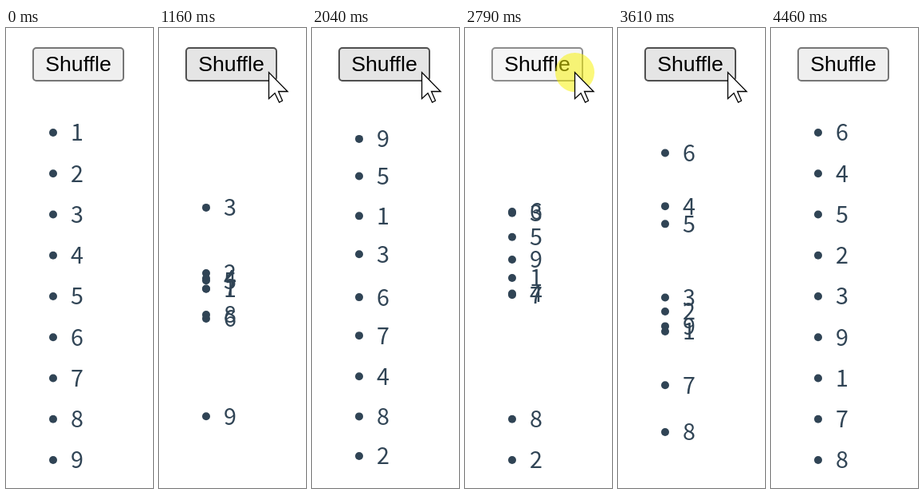
Animation, 184 px wide and 576 px high, one loop 4500 ms. Source, as an HTML page:

```html
<!DOCTYPE html>
<html lang="en">
<head>
<meta charset="utf-8">
<title>Shuffle list</title>
<style>
  html, body { margin: 0; width: 100%; height: 100%; overflow: hidden; background: #fff; }
  svg { display: block; width: 184px; height: 576px; }
  .button rect { fill: #efefef; stroke: #767676; stroke-width: 2; }
  .button.hover rect { fill: #e5e5e5; stroke: #4f4f4f; }
  .button.active rect { fill: #f5f5f5; stroke: #8d8d8d; }
  .button text { font: 26.67px "Liberation Sans", Arial, sans-serif; text-anchor: middle; }
  .list { fill: #304455; font: 28.7px "Noto Sans CJK SC", "Noto Sans CJK JP", "Noto Sans", sans-serif; text-anchor: middle; }
  .halo { fill: rgba(248, 242, 0, .52); }
  .cursor { fill: #fff; stroke: #000; stroke-width: 1.3; }
</style>
</head>
<body>
<svg viewBox="0 0 184 576">
  <g class="button">
    <rect x="34" y="25" width="113" height="41" rx="4"/>
    <text x="90.5" y="54">Shuffle</text>
  </g>
  <g class="list"></g>
  <circle class="halo" cx="137.5" cy="55.5" r="24.5"/>
  <path class="cursor" d="M137.5 55.5V88.5L145 81.5L150.5 93L154.5 91L149.5 79.5H161Z"/>
</svg>
<script>
const LOOP = 4500, MOVE = 1000, TOP = 131, ROW = 51.25;
const START = "123456789";

// press time, release time, order after the click
const clicks = [
  [440, 497, "378496512"],
  [725, 790, "526431879"],
  [945, 1010, "738125469"],
  [1165, 1230, "951367482"],
  [2410, 2489, "634751982"],
  [2730, 2800, "657318429"],
  [2945, 3010, "146958273"],
  [3155, 3220, "645239178"]
];

const $ = s => document.querySelector(s);
const button = $(".button"), list = $(".list"), halo = $(".halo"), cursor = $(".cursor");

function add(tag, attrs, parent) {
  const el = document.createElementNS("http://www.w3.org/2000/svg", tag);
  for (const k in attrs) el.setAttribute(k, attrs[k]);
  return parent.appendChild(el);
}

const items = [...START].map(digit => {
  const el = add("g", {}, list);
  add("circle", { cx: 59, cy: 0, r: 5 }, el);
  add("text", { x: 89, y: 10.4 }, el).textContent = digit;
  return { digit, el };
});

// CSS "ease": cubic-bezier(.25, .1, .25, 1)
function ease(x) {
  if (x <= 0) return 0;
  if (x >= 1) return 1;
  const bez = (a, b, u) => 3 * a * u * (1 - u) ** 2 + 3 * b * u * u * (1 - u) + u ** 3;
  let lo = 0, hi = 1;
  for (let i = 0; i < 24; i++) {
    const mid = (lo + hi) / 2;
    if (bez(.25, .25, mid) < x) lo = mid; else hi = mid;
  }
  return bez(.1, 1, lo);
}

// Each click starts a new move from wherever the item is
function slotAt(digit, t) {
  let slot = START.indexOf(digit);
  clicks.forEach(([, start, order], i) => {
    if (t <= start) return;
    const end = i + 1 < clicks.length ? Math.min(t, clicks[i + 1][1]) : t;
    slot += (order.indexOf(digit) - slot) * ease((end - start) / MOVE);
  });
  return slot;
}

function draw(t) {
  for (const { digit, el } of items)
    el.setAttribute("transform", `translate(0 ${(TOP + ROW * slotAt(digit, t)).toFixed(2)})`);

  const away = Math.max(0, (130 - t) * .45, (t - 4340) * .45);
  cursor.setAttribute("transform", `translate(${away} ${away * .5})`);
  cursor.style.visibility = away < 47 ? "visible" : "hidden";

  const pressed = clicks.some(([down, up]) => t >= down && t < up);
  halo.style.visibility = pressed ? "visible" : "hidden";
  button.classList.toggle("hover", away < 10);
  button.classList.toggle("active", pressed);
}

function frame() {
  draw(performance.now() % LOOP);
  requestAnimationFrame(frame);
}
frame();
</script>
</body>
</html>
```
